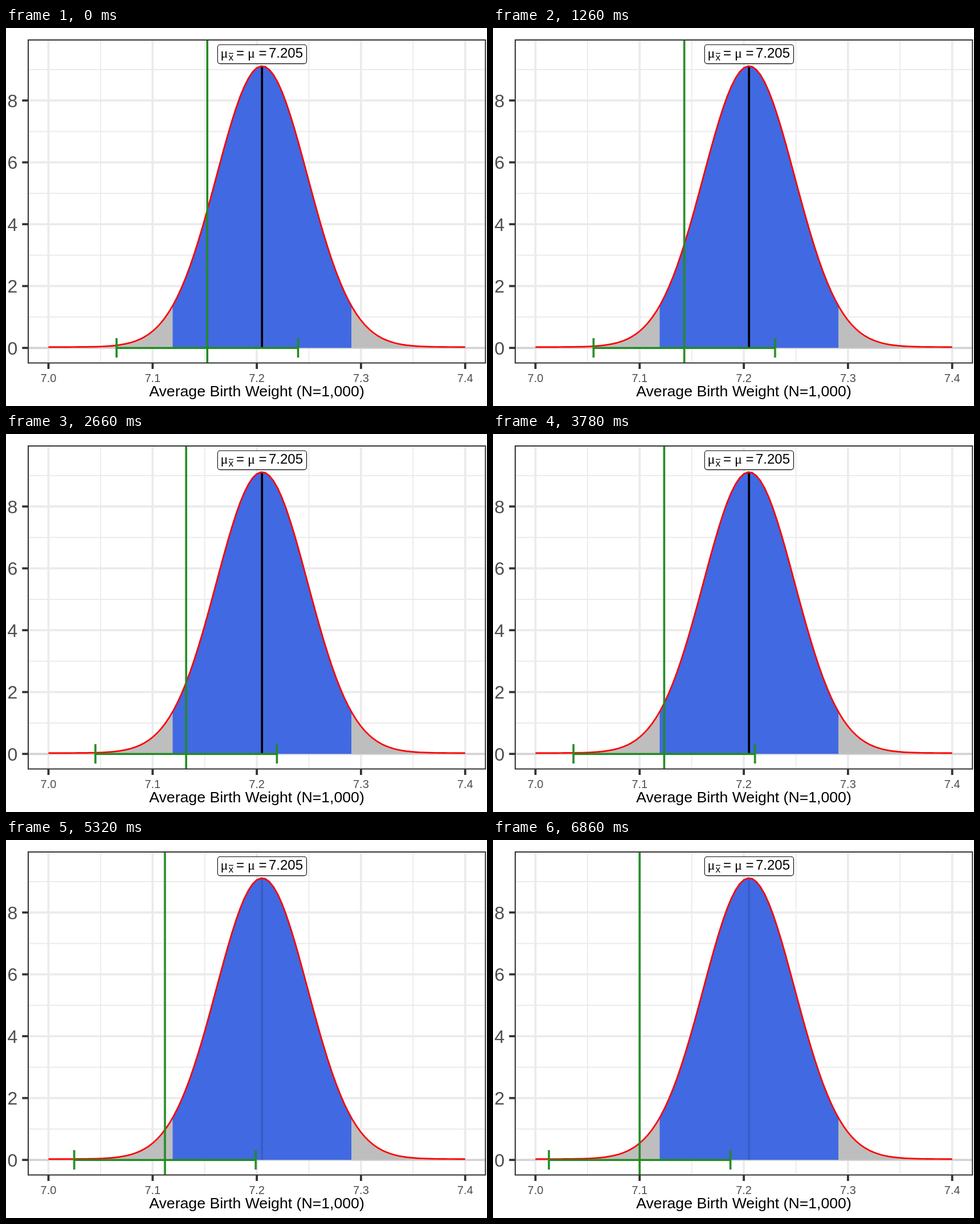
Animation, 844 px wide and 663 px high, one loop 7000 ms. Source, as an HTML page:

```html
<!DOCTYPE html>
<html lang="en">
<head>
<meta charset="utf-8">
<title>Confidence interval</title>
<style>
  html, body { margin: 0; width: 100%; height: 100%; overflow: hidden; background: #fff; }
  svg { display: block; width: 100%; height: 100%; font-family: "Liberation Sans", Arial, sans-serif; }
  .mu { font-family: "Liberation Serif", "Times New Roman", serif; }
  #yLabels { font-size: 32px; fill: #4d4d4d; text-anchor: end; }
  #xLabels { font-size: 20px; fill: #4d4d4d; text-anchor: middle; }
  #interval { animation: slide 7s steps(50, end) infinite; }
  #mean { animation: fade 7s step-end infinite; }
  @keyframes slide { to { transform: translateX(-97.86px); } }
  @keyframes fade { 0% { opacity: 1; } 66%, 100% { opacity: .12; } }
</style>
</head>
<body>
<svg viewBox="0 0 844 663">
  <path id="minor" stroke="#ebebeb" stroke-width="1.9"/>
  <path id="major" stroke="#ebebeb" stroke-width="3.8"/>
  <path d="M39 561.3H841" stroke="#d3d3d3" stroke-width="3.6"/>
  <path id="tails" fill="#bebebe"/>
  <path id="middle" fill="#4169e1"/>
  <path id="mean" d="M449.2 67V561" stroke="#000" stroke-width="3.7"/>
  <path id="curve" fill="none" stroke="#f00" stroke-width="2.7" stroke-linejoin="round"/>

  <g id="interval" fill="none" stroke="#228b22" stroke-width="3.6">
    <path d="M353.2 21V588M194 561.2H512.5M194 544V578M512.5 544V578"/>
  </g>

  <rect x="371.3" y="29.2" width="156.2" height="33.4" rx="4.5" fill="#fff" stroke="#000" stroke-width="1.1"/>
  <g font-size="24">
    <text class="mu" x="376.6" y="52">μ</text>
    <text x="390.6" y="57" font-size="17">x</text>
    <path d="M391 44.5H399" stroke="#000" stroke-width="1.3"/>
    <text x="404" y="52">=</text>
    <text class="mu" x="424" y="52">μ</text>
    <text x="443.4" y="52">=</text>
    <text x="461" y="52">7.205</text>
  </g>

  <rect x="39" y="21" width="802.3" height="566.5" fill="none" stroke="#333" stroke-width="2"/>
  <path id="ticks" stroke="#333" stroke-width="3.8"/>
  <g id="yLabels"></g>
  <g id="xLabels"></g>
  <text x="440" y="646" font-size="26.67" text-anchor="middle">Average Birth Weight (N=1,000)</text>
</svg>
<script>
  const MEAN = 7.205, SD = 0.0438, LOW = MEAN - 1.96 * SD, HIGH = MEAN + 1.96 * SD;
  const px = v => 74.5 + (v - 7) * 1828;
  const py = v => 561.2 - v * 54.25;
  const curveY = v => 559.6 - 492.8 * Math.exp(-(((v - MEAN) / SD) ** 2) / 2);
  const draw = (id, d) => document.getElementById(id).setAttribute("d", d);

  function trace(from, to) {
    const count = 100;
    return Array.from({ length: count + 1 }, (_, i) => {
      const v = from + (to - from) * i / count;
      return px(v).toFixed(2) + " " + curveY(v).toFixed(2);
    }).join("L");
  }
  const area = (from, to) => `M${px(from)} 561L${trace(from, to)}L${px(to)} 561Z`;

  function label(id, x, y, text) {
    const node = document.createElementNS("http://www.w3.org/2000/svg", "text");
    node.setAttribute("x", x);
    node.setAttribute("y", y);
    node.textContent = text;
    document.getElementById(id).append(node);
  }

  draw("tails", area(7, LOW) + area(HIGH, 7.4));
  draw("middle", area(LOW, HIGH));
  draw("curve", "M" + trace(7, 7.4));

  let major = "", minor = "", ticks = "";
  for (let i = 0; i < 5; i++) {
    const x = px(7 + i / 10), y = py(2 * i);
    major += `M${x} 21V587M39 ${y}H841`;
    minor += `M39 ${py(2 * i + 1)}H841`;
    if (i < 4) minor += `M${px(7.05 + i / 10)} 21V587`;
    ticks += `M${x} 588V598M28.3 ${y}H38.5`;
    label("xLabels", x, 621, (7 + i / 10).toFixed(1));
    label("yLabels", 20.3, y + 11.4, 2 * i);
  }
  draw("major", major);
  draw("minor", minor);
  draw("ticks", ticks);
</script>
</body>
</html>
```
